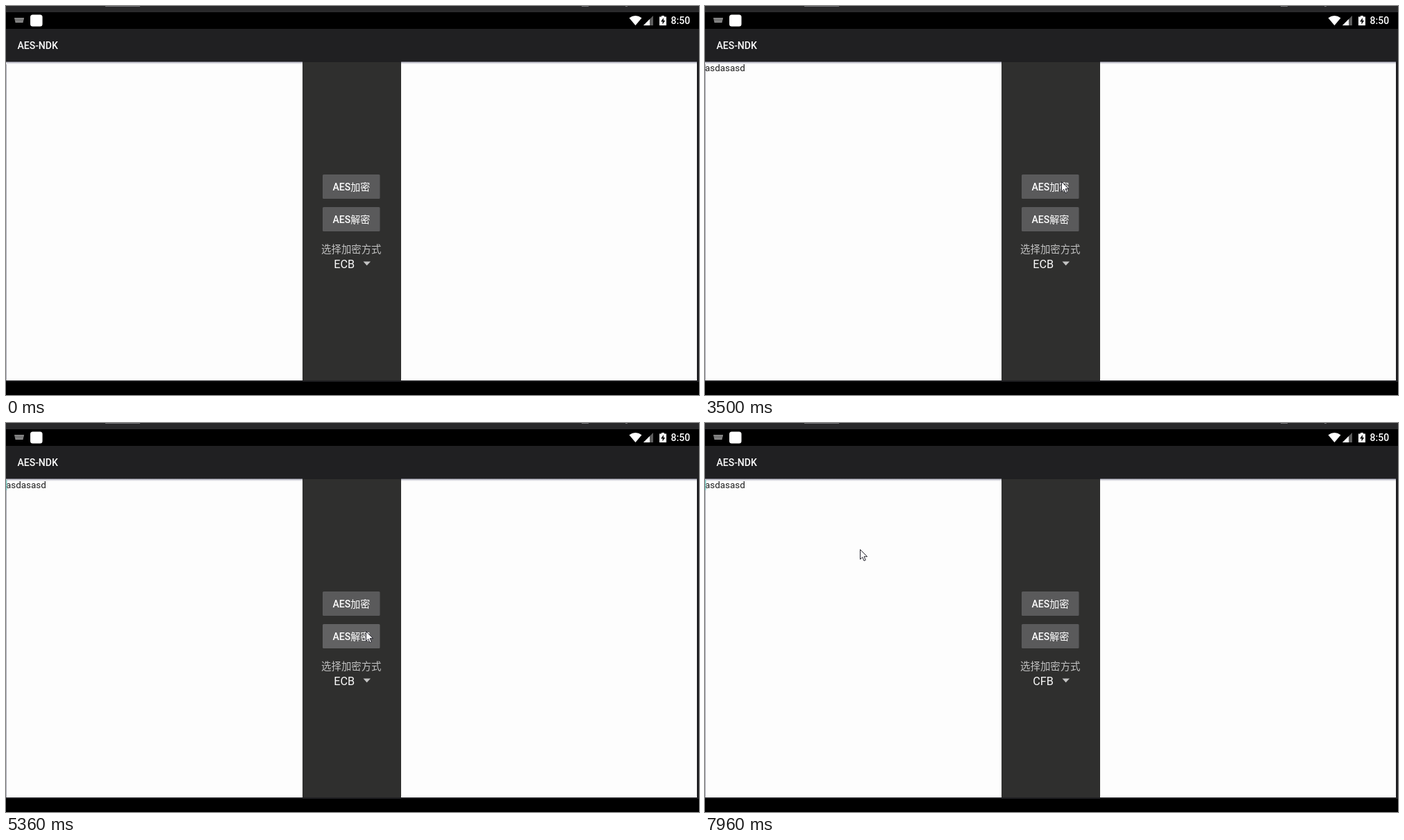
An HTML page that plays this animation: 998x561 px, repeating every 8 s.

```html
<!DOCTYPE html>
<html lang="zh-CN">
<head>
<meta charset="utf-8">
<title>AES-NDK</title>
<style>
html, body { margin: 0; width: 100%; height: 100%; overflow: hidden; background: #000; }
svg { display: block; width: 100%; height: 100%; }
text { font-family: Roboto, "Noto Sans CJK SC", "Noto Sans CJK", sans-serif; white-space: pre; }
.bold { font-size: 14px; font-weight: 500; fill: #fff; }
.field { font-size: 13.4px; fill: #1c1c1c; }
.mode { font-size: 16.2px; fill: #fafafa; }
</style>
</head>
<body>
<svg viewBox="0 0 998 561" preserveAspectRatio="none">
  <defs>
    <linearGradient id="shade" x1="0" y1="0" x2="0" y2="1">
      <stop offset="0" stop-color="#aeaebd"/>
      <stop offset="1" stop-color="#fdfdfd"/>
    </linearGradient>
    <filter id="drop" x="-40%" y="-20%" width="180%" height="140%">
      <feDropShadow dx="0" dy="4" stdDeviation="4" flood-color="#000" flood-opacity=".45"/>
    </filter>
  </defs>

  <rect width="998" height="561" fill="#000"/>
  <rect width="998" height="9" fill="#29292b"/>
  <path d="M143 .5H193M829 .5H839M892 .5H895" stroke="#77777a"/>
  <rect y="33" width="998" height="48" fill="#202022"/>
  <rect y="81" width="998" height="461" fill="#1e1e21"/>
  <rect x="427" y="81" width="142" height="459" fill="#2f2f2e"/>
  <rect y="81" width="1" height="459" fill="#a9a9b4"/>
  <g fill="#fdfdfd">
    <rect x="1" y="81" width="426" height="459"/>
    <rect x="569" y="81" width="426" height="459"/>
  </g>
  <path d="M0 80.5H427V84H0ZM569 80.5H995V84H569Z" fill="url(#shade)"/>

  <!-- status bar -->
  <path d="M12 17H26L24.5 24H13.5Z" fill="#8c8c8c"/>
  <path d="M13 19.2H25M13.5 21.4H24.5" stroke="#222" stroke-width=".8" stroke-dasharray="1 1"/>
  <rect x="35" y="12.5" width="17.5" height="17" rx="3.5" fill="#fff"/>
  <path d="M897.5 17.3Q906.5 10.5 915.5 17.3L906.5 28Z" fill="#fff"/>
  <path d="M932 14V28H918Z" fill="#5c5c5c"/>
  <path d="M927 19V28H918Z" fill="#fff"/>
  <path d="M941 15.5H944V14H948V15.5H951V28H941Z" fill="#fff"/>
  <path d="M947 17L943 22.5H945.5V26.5L949.3 21H947Z" fill="#111"/>
  <text class="bold" x="957.5" y="26">8:50</text>
  <text class="bold" x="16.5" y="62">AES-NDK</text>

  <!-- centre column -->
  <rect id="encrypt" x="456" y="243" width="82.5" height="35" rx="1.5"/>
  <rect id="decrypt" x="456" y="290" width="82.5" height="35" rx="1.5"/>
  <g text-anchor="middle">
    <text class="bold" x="497.3" y="266">AES加密</text>
    <text class="bold" x="497.3" y="313">AES解密</text>
    <text x="497.3" y="356" font-size="14.4" fill="#c3c3c3">选择加密方式</text>
  </g>
  <text id="mode" class="mode" x="472.3" y="378"></text>
  <path d="M514.5 368.5H525L519.7 374.3Z" fill="#c4c4c4"/>

  <text id="left" class="field" x="0" y="94"></text>
  <text id="right" class="field" x="568.6" y="94"></text>
  <rect id="caret" y="82" width="1.5" height="15" fill="#80cbc4"/>

  <g id="menu">
    <rect x="464.5" y="360" width="49.5" height="141.5" rx="1.5" fill="#2f2f2f" filter="url(#drop)"/>
    <text class="mode" x="472.3" y="389.5">CBC</text>
    <text class="mode" x="472.3" y="436.7">CFB</text>
    <text class="mode" x="472.3" y="484">ECB</text>
  </g>

  <path id="cursor" d="M.5 .5V14.6L3.8 11.5L6 16.7L8.3 15.7L6.1 10.7H10.6Z" fill="#fff" stroke="#25252f"/>
</svg>
<script>
const LOOP = 8000;
const PLAIN = "asdasasd";
const CIPHER = "bnkcW17ACVgtmCRyAylRNQ==";
const KEYS = [1600, 1800, 2000, 2250, 2500, 2780, 2870, 2960];
const ENCRYPT = 3780, DECRYPT = 5240, OPEN = 6150, PICK = 7540;

// time, x, y of the pointer tip
const PATH = [
  [260, 720, 562], [700, 440, 400], [1120, 246, 222], [1200, 246, 222],
  [1400, 242, 208], [2760, 242, 208], [3400, 513, 253], [4440, 513, 253],
  [4760, 518, 300], [5440, 518, 300], [5920, 493, 368], [6500, 493, 368],
  [6780, 493, 386], [6900, 493, 405], [7200, 490, 427], [7560, 490, 427],
  [7940, 223, 182], [8000, 223, 182]
];

const $ = id => document.getElementById(id);
const [left, right, mode, caret, menu, cursor] =
  ["left", "right", "mode", "caret", "menu", "cursor"].map($);

const clamp = v => Math.max(0, Math.min(1, v));
const ease = v => v * v * (3 - 2 * v);
const show = (el, on) => el.setAttribute("visibility", on ? "visible" : "hidden");
const write = (el, s) => { if (el.textContent !== s) el.textContent = s; };

function pointerAt(t) {
  const i = PATH.findIndex(p => p[0] > t);
  if (i < 1) return PATH[i < 0 ? PATH.length - 1 : 0].slice(1);
  const [a, ax, ay] = PATH[i - 1], [b, bx, by] = PATH[i];
  const k = ease((t - a) / (b - a));
  return [ax + (bx - ax) * k, ay + (by - ay) * k];
}

function paintButton(id, t, down) {
  const press = clamp((t - down) / 80) * (1 - clamp((t - down - 240) / 280));
  const v = Math.round(90 + 28 * press);
  $(id).setAttribute("fill", `rgb(${v},${v},${v + 1})`);
}

function draw(t) {
  const typed = KEYS.filter(k => k <= t).length;
  const hidden = t >= ENCRYPT && t < DECRYPT;
  write(left, hidden ? "" : PLAIN.slice(0, typed));
  write(right, hidden ? CIPHER : "");
  write(mode, t < PICK ? "ECB" : "CFB");

  const typing = t >= KEYS[0] && t < 3500;
  const blink = Math.floor(t / 500) % 2 === 0;
  show(caret, t >= 1400 && (typing || blink || t >= 6000));
  caret.setAttribute("x", t < ENCRYPT && typed ? left.getComputedTextLength() : 0);

  paintButton("encrypt", t, 3600);
  paintButton("decrypt", t, 4920);

  show(menu, t >= OPEN && t < PICK + 160);
  menu.setAttribute("opacity", clamp((t - OPEN) / 180) * (1 - clamp((t - PICK) / 160)));

  show(cursor, t >= 260);
  cursor.setAttribute("transform", `translate(${pointerAt(t).map(Math.round)})`);
}

const start = performance.now();
function tick() {
  draw((performance.now() - start) % LOOP);
  requestAnimationFrame(tick);
}
tick();
</script>
</body>
</html>
```
